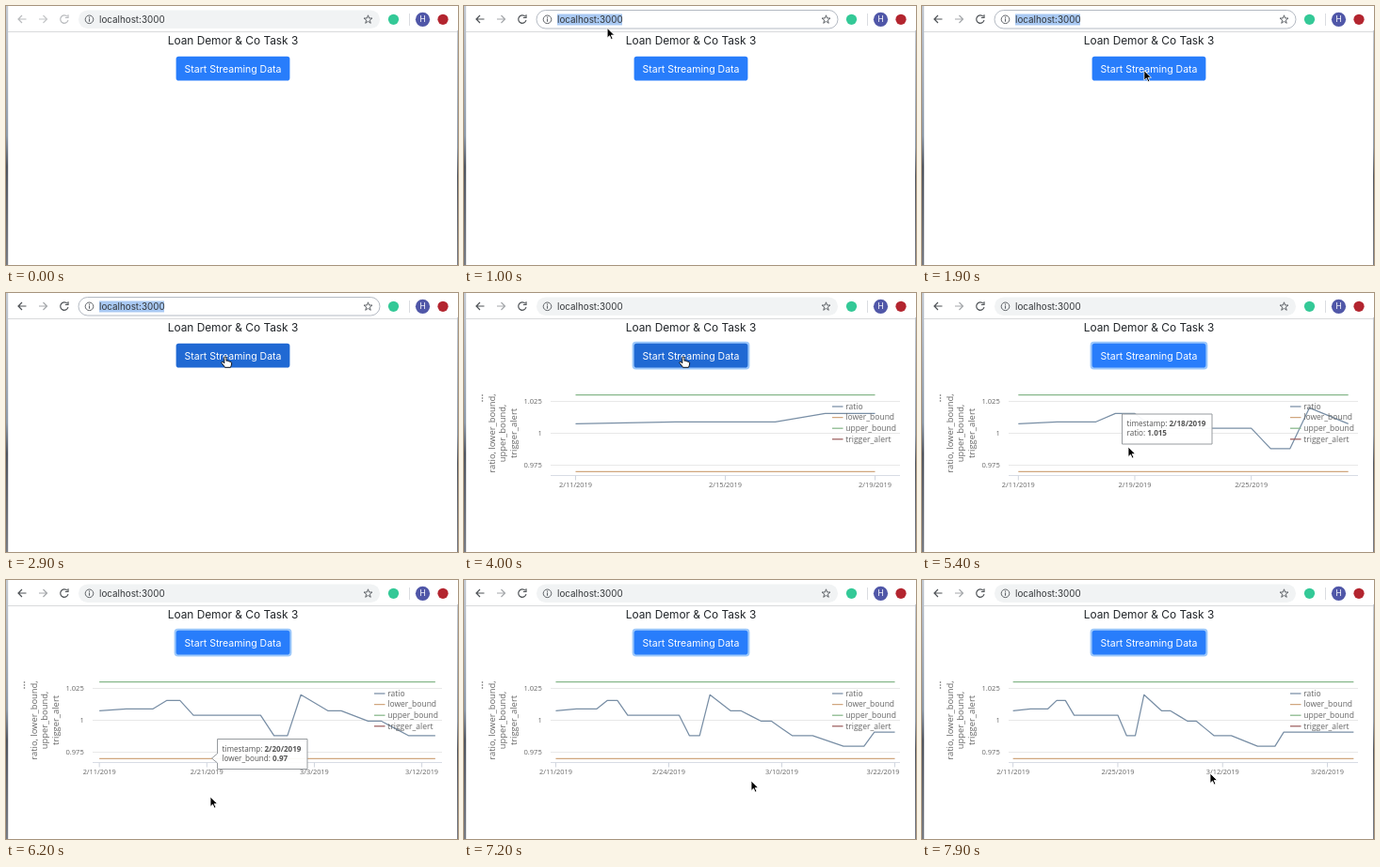
An HTML page that plays this animation: 480 by 276 pixels, repeating every 8000 ms.

```html
<!DOCTYPE html>
<html lang="en">
<head>
<meta charset="utf-8">
<title>Streaming chart</title>
<style>
  html, body { margin: 0; width: 100%; height: 100%; overflow: hidden; background: #fff; }
  svg { display: block; width: 100vw; height: 100vh; }
  .ui { font-family: Inter, Roboto, sans-serif; }
  .chart { font-family: "Open Sans", "Noto Sans", sans-serif; fill: #666; }
  .mid { text-anchor: middle; }
  .line { stroke-width: 1.25; stroke-linejoin: round; }
</style>
</head>
<body>
<svg id="stage" viewBox="0 0 480 276" xmlns="http://www.w3.org/2000/svg">
  <defs>
    <linearGradient id="wall" x1="0" y1="0" x2="0" y2="1">
      <stop offset="0" stop-color="#c3c9d2"/>
      <stop offset=".5" stop-color="#8d9aaa"/>
      <stop offset=".62" stop-color="#4f5560"/>
      <stop offset="1" stop-color="#777b84"/>
    </linearGradient>
  </defs>
  <rect width="480" height="276" fill="#fff"/>
  <path d="M2 27.5H479" stroke="#d9dadc"/>
  <rect width="2.2" height="276" fill="url(#wall)"/>
  <rect x="479" y="26" width="1" height="250" fill="url(#wall)"/>

  <g fill="none" stroke-width="1.2">
    <path id="back" d="M21.5 14H13M17 10l-4 4 4 4"/>
    <path id="forward" d="M35 14h8.5M39.5 10l4 4-4 4"/>
    <path id="reload" d="M65 11.2A4.2 4.2 0 1 0 66 15.2M66 9.3v3.2h-3.2"/>
  </g>
  <rect id="pill" x="77" y="4.5" width="320" height="19.5" rx="9.75"/>
  <g fill="none" stroke="#5f6368">
    <circle cx="88.5" cy="14.3" r="4.3"/>
    <path d="M88.5 13.5v3.3M88.5 11.5v1.2" stroke-width="1.1"/>
    <path id="star" stroke-linejoin="round"/>
  </g>
  <rect id="selection" x="99" y="8.5" width="69" height="12" fill="#a9c9f3"/>
  <text class="ui" x="99" y="17.6" font-size="9.85" fill="#333639">localhost:3000</text>
  <circle cx="411.5" cy="14.3" r="5.6" fill="#34c997"/>
  <path d="M428.5 8v13" stroke="#dadce0"/>
  <circle cx="442.5" cy="14.3" r="7.6" fill="#5057a8"/>
  <text class="ui mid" x="442.5" y="17.3" font-size="8.3" fill="#fff">H</text>
  <circle cx="464" cy="14.3" r="5.6" fill="#b3252f"/>

  <text class="ui mid" x="241" y="41" font-size="11.85" fill="#212529">Loan Demor &amp; Co Task 3</text>
  <rect id="ring" x="178.6" y="51.7" width="124.8" height="29.9" rx="4" fill="#9cc8fb"/>
  <rect id="button" x="180.6" y="53.7" width="120.8" height="25.9" rx="2.8"/>
  <text class="ui mid" x="241" y="70.7" font-size="10.5" fill="#fff">Start Streaming Data</text>

  <g id="chart" class="chart">
    <g id="frame"></g>
    <g id="series"></g>
    <g id="legend"></g>
  </g>
  <g id="tip" class="chart" font-size="8.1"></g>
  <path id="arrow" d="M0 0v10.5l2.5-2.3 1.7 3.9 1.7-.75-1.7-3.8h3.4z" fill="#000" stroke="#fff" stroke-width=".8"/>
  <path id="hand" d="M-1.2 1.1C-1.2-.6 1-.6 1 1.1v3.3c1-.7 1.9-.3 2 .5 1-.5 1.7-.1 1.9.6 1-.3 1.7.2 1.7 1.2 0 2.2-.6 3-1.2 4.6H-.5c-.7-1.700-2.2-2.7-3.5-4.6-.6-1.1.7-1.9 1.6-1l1.2 1.1z" fill="#fff" stroke="#000" stroke-width=".9"/>
</svg>
<script>
const LOOP = 8000, STEP = 100;
const ACTIVE = 400, SELECT = 800, CLICK = 3000, OPEN = 3200;
const LEFT = 92, RIGHT = 463, DAYS = 40;
const LOWER = .97, UPPER = 1.03;
const BLUE = '#788ea5', TAN = '#d0a67e', GREEN = '#86b78a', RED = '#9d5e5e';

// Ratio plateaus joined by straight lines: first day, last day, thousandths off 1
const plateaus = [[0, 0, 7.4], [2, 4, 9], [5, 6, 15.5], [7, 12, 4], [13, 14, -12], [15, 15, 20],
  [17, 18, 7.5], [20, 21, -.7], [23, 25, -12], [28, 30, -20.3], [31, DAYS, -9.3]];
const corners = plateaus.flatMap(([a, b, v]) => [[a, v], [b, v]]);
const ratio = day => 1 + at(corners, day) / 1000;

// Calendar days after 2/11 without data
const gaps = new Set([3, 5, 16, 18, 24, 34, 41]);
const dates = [];
for (let d = 0; dates.length < DAYS; d++) {
  if (!gaps.has(d)) dates.push(new Date(2019, 1, 11 + d).toLocaleDateString('en-US'));
}

// [time, days received]
const stream = [[3200, 0], [4000, 7], [5400, 18], [6200, 26], [7900, DAYS]];
// [time, x, y]
const pointer = [[ACTIVE, 205, 120], [700, 140, 17], [900, 140, 17], [1700, 237, 69], [2400, 233, 68],
  [4100, 233, 68], [5400, 219, 164], [6200, 217, 231], [7200, 305, 214], [7400, 306, 206]];
const tips = [
  { from: 5200, to: 5600, x: 212.5, y: 129, day: 5, name: 'ratio', value: '1.015' },
  { from: 5800, to: 6500, x: 224.5, y: 169.5, day: 7, name: 'lower_bound', value: LOWER, nose: 190 }
];

const $ = id => document.getElementById(id);
const set = (id, attrs) => { for (const k in attrs) $(id).setAttribute(k, attrs[k]); };
const show = (id, on) => set(id, { visibility: on ? 'visible' : 'hidden' });
const yOf = v => 149.5 - (v - 1) * 1360;
const text = (x, y, s, extra = '') => `<text x="${x}" y="${y}" ${extra}>${s}</text>`;
const path = (d, color, extra = '') => `<path d="${d}" stroke="${color}" fill="none" ${extra}/>`;
const polyline = points => 'M' + points.map(p => p.map(c => c.toFixed(2))).join('L');

// Linear interpolation between keyed rows
function at(keys, t, col = 1) {
  const i = keys.findIndex(k => k[0] > t);
  if (i === 0) return keys[0][col];
  if (i < 0) return keys[keys.length - 1][col];
  const a = keys[i - 1], b = keys[i];
  return a[col] + (b[col] - a[col]) * (t - a[0]) / (b[0] - a[0]);
}

function buildStatic() {
  const starPoints = Array.from({ length: 10 }, (_, i) => {
    const r = i % 2 ? 1.9 : 4.7, a = i * Math.PI / 5;
    return [384.5 + r * Math.sin(a), 14.5 - r * Math.cos(a)];
  });
  set('star', { d: polyline(starPoints) + 'Z' });

  let out = path(`M${LEFT} 194.5H${RIGHT}`, '#d8dce4');
  for (const v of [1.025, 1, .975]) {
    out += path(`M${LEFT} ${yOf(v)}H${RIGHT}`, '#e8e8e8');
    out += text(82.8, yOf(v) + 2.7, v, 'font-size="7.6" text-anchor="end"');
  }
  ['ratio, lower_bound,', 'upper_bound,', 'trigger_alert'].forEach((s, i) => {
    out += text(0, 0, s, `class="mid" font-size="9.4" transform="translate(${33 + i * 11.3} 149.5) rotate(-90)"`);
  });
  for (let i = 0; i < 3; i++) out += `<circle cx="19.5" cy="${109 + 3 * i}" r=".8"/>`;
  $('frame').innerHTML = out;

  $('legend').innerHTML = [['ratio', BLUE], ['lower_bound', TAN], ['upper_bound', GREEN], ['trigger_alert', RED]]
    .map(([s, color], i) => {
      const y = 121 + i * 11.6;
      return path(`M391 ${y}h11.5`, color, 'class="line"') + text(405.3, y + 2.8, s, 'font-size="8.5"');
    }).join('');
}

function drawSeries(n) {
  if (!n) return $('series').innerHTML = '';
  const band = (RIGHT - LEFT) / n, xOf = i => LEFT + (i + .5) * band;
  const every = Math.ceil(n / 3.34);
  let out = '';
  for (let i = 0; i < n; i += every) {
    const x = xOf(i);
    out += path(`M${x} 194.5v5`, '#d0d5de');
    out += text(Math.min(x, RIGHT - 18), 207, dates[i], 'class="mid" font-size="7.4"');
  }
  const plot = (f, color) => {
    out += path(polyline(Array.from({ length: n }, (_, i) => [xOf(i), yOf(f(i))])), color, 'class="line"');
  };
  plot(() => LOWER, TAN);
  plot(() => UPPER, GREEN);
  plot(ratio, BLUE);
  $('series').innerHTML = out;
}

function drawTip(t) {
  const p = tips.find(q => t >= q.from && t < q.to);
  if (!p) return $('tip').innerHTML = '';
  const { x, y } = p;
  const nose = p.nose ? `V${p.nose + 5}l-6 -5l6 -5` : '';
  const row = (dy, name, value) => text(x + 5, y + dy, `${name}: <tspan font-weight="700">${value}</tspan>`, 'fill="#555"');
  $('tip').innerHTML =
    `<path d="M${x} ${y}h95.5v32h-95.5${nose}Z" fill="#fff" fill-opacity=".94" stroke="#979b9f" stroke-linejoin="round"/>` +
    row(13, 'timestamp', dates[p.day]) + row(23.3, p.name, p.value);
}

function render(t) {
  const active = t >= ACTIVE, clicked = t >= CLICK, focused = t >= SELECT && !clicked;
  const x = at(pointer, t, 1), y = at(pointer, t, 2);
  const over = t > 2200 && x > 181 && x < 301 && y > 54 && y < 79;

  const ink = active ? '#4f5357' : '#b9bbbe';
  set('back', { stroke: ink });
  set('reload', { stroke: ink });
  set('forward', { stroke: active ? '#a5a8ab' : '#c4c6c8' });
  set('pill', { fill: focused ? '#fff' : '#f1f3f4', stroke: focused ? '#b4bac3' : 'none' });
  show('selection', focused);
  show('ring', clicked);
  set('button', { fill: over ? '#2069d3' : '#287dfb' });

  show('chart', t >= OPEN);
  drawSeries(Math.floor(at(stream, t) + 1e-6));
  drawTip(t);

  show('arrow', active && !over);
  show('hand', over);
  for (const id of ['arrow', 'hand']) set(id, { transform: `translate(${x} ${y})` });
}

buildStatic();
const start = performance.now();
function tick() {
  const t = (performance.now() - start) % LOOP;
  render(Math.floor(t / STEP) * STEP);
  requestAnimationFrame(tick);
}
tick();
</script>
</body>
</html>
```
